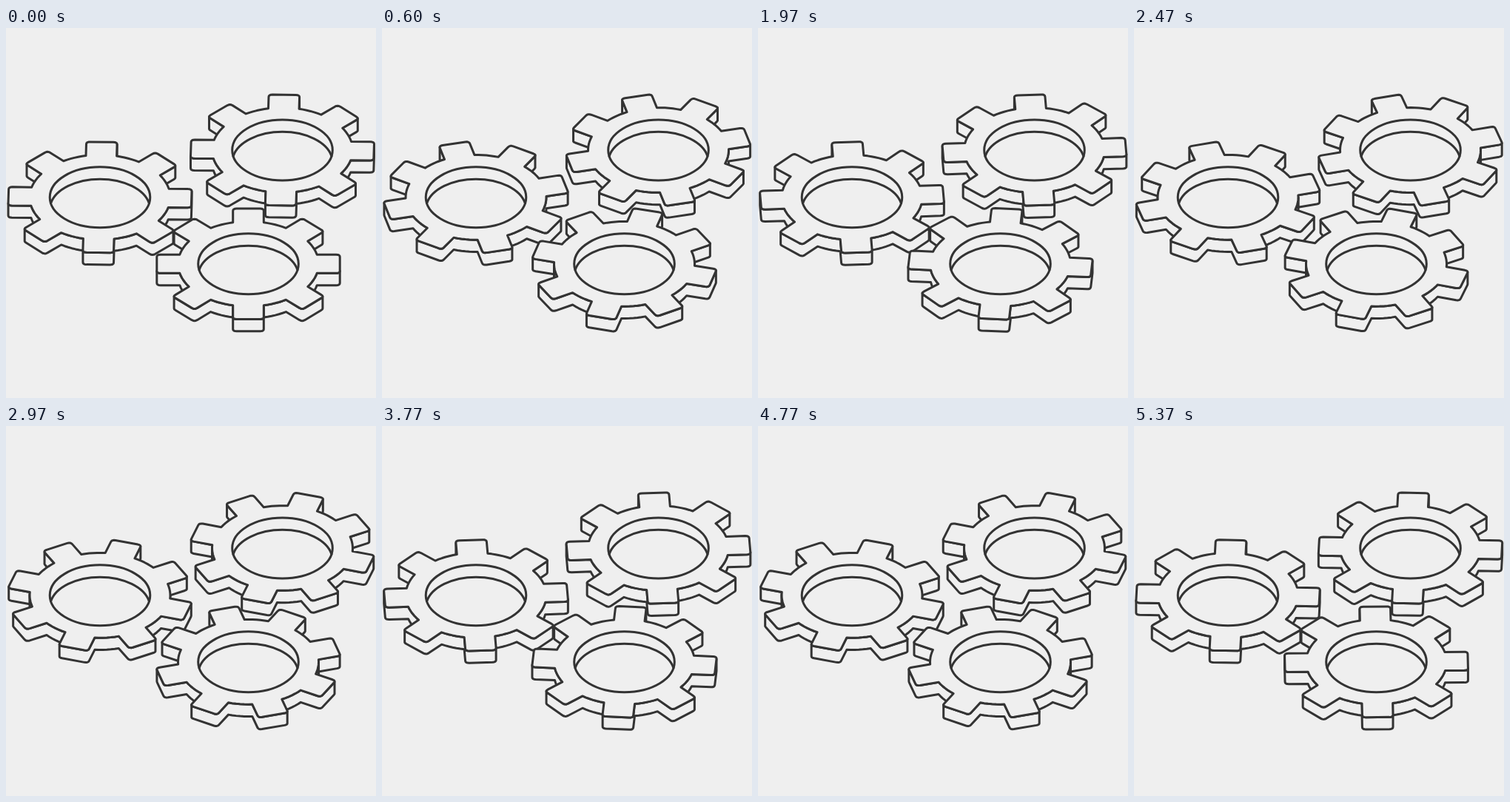
Animation, 500 px wide and 500 px high, one loop 5.41 s. Source, as an HTML page:

```html
<!DOCTYPE html>
<html lang="en">
<head>
<meta charset="utf-8">
<title>Gears</title>
<style>
  html, body { margin: 0; width: 100%; height: 100%; overflow: hidden; background: #efefef; }
  svg { display: block; width: 100vw; height: 100vh; }
  path, ellipse { fill: #efefef; stroke: #333; stroke-width: 3; stroke-linejoin: round; stroke-linecap: round; }
  .edge { fill: none; }
</style>
</head>
<body>
<svg viewBox="0 0 500 500"></svg>
<script>
const LOOP = 5410, STEP = 100 / 3, STEPS = 162, TEETH = 8;
const TILT = 0.604, DEPTH = 16.3;
const TIP = 123.7, ROOT = 95, HOLE = 67.8;
const HALF_TOOTH = 20.8, ROUND = 5;
const RAD = Math.PI / 180;

const gears = [
  { x: 373.5, y: 165, start: 1.1, dir: -1 },
  { x: 127, y: 228.8, start: 1.1, dir: -1 },
  { x: 327.5, y: 318.8, start: 0, dir: 1 }
];

const svg = document.querySelector('svg');
const mix = (a, b, t) => [a[0] + (b[0] - a[0]) * t, a[1] + (b[1] - a[1]) * t];
const toward = (a, b, d) => mix(a, b, d / Math.hypot(b[0] - a[0], b[1] - a[1]));
const line = points => points.map(p => p[0].toFixed(2) + ' ' + p[1].toFixed(2)).join('L');

function corner(before, at, after) {
  const a = toward(at, before, ROUND), b = toward(at, after, ROUND);
  return [0, 0.25, 0.5, 0.75, 1].map(t => mix(mix(a, at, t), mix(at, b, t), t));
}

// One tooth pointing along +x, followed by the arc of the gap after it.
function toothProfile() {
  const rootAngle = Math.asin(HALF_TOOTH / ROOT);
  const rootX = ROOT * Math.cos(rootAngle);
  const r1 = [rootX, -HALF_TOOTH], t1 = [TIP, -HALF_TOOTH];
  const t2 = [TIP, HALF_TOOTH], r2 = [rootX, HALF_TOOTH];
  const points = [r1, ...corner(r1, t1, t2), ...corner(t1, t2, r2), r2];
  const gap = 2 * Math.PI / TEETH - 2 * rootAngle;
  for (let i = 1; i < 6; i++) {
    const a = rootAngle + gap * i / 6;
    points.push([ROOT * Math.cos(a), ROOT * Math.sin(a)]);
  }
  return points;
}
const profile = toothProfile();

function outline(gear, degrees) {
  const points = [];
  for (let i = 0; i < TEETH; i++) {
    const a = (degrees - 90 + i * 360 / TEETH) * RAD, c = Math.cos(a), s = Math.sin(a);
    for (const [x, y] of profile) {
      points.push([gear.x + x * c - y * s, gear.y + TILT * (x * s + y * c)]);
    }
  }
  return points;
}

// Contiguous stretches of the rim that face the viewer, far ones first.
function frontRuns(points) {
  const n = points.length, at = i => points[i % n];
  const faces = i => at(i + 1)[0] < at(i)[0];
  let first = 0;
  while (faces(first)) first++;
  const runs = [];
  let run = null;
  for (let i = first; i <= first + n; i++) {
    if (faces(i)) {
      if (!run) runs.push(run = [at(i)]);
      run.push(at(i + 1));
    } else run = null;
  }
  const nearest = r => Math.max(...r.map(p => p[1]));
  return runs.sort((a, b) => nearest(a) - nearest(b));
}

function drawGear(gear, step) {
  const points = outline(gear, gear.start + gear.dir * step * 135 / STEPS);
  const walls = frontRuns(points).map(run => {
    const bottom = run.map(([x, y]) => [x, y + DEPTH]).reverse();
    return `<path d="M${line([...run, ...bottom])}Z"/>`;
  }).join('');
  const ry = HOLE * TILT;
  const reach = HOLE * Math.sqrt(1 - (DEPTH / 2 / ry) ** 2);
  return walls +
    `<path d="M${line(points)}Z"/>` +
    `<ellipse cx="${gear.x}" cy="${gear.y}" rx="${HOLE}" ry="${ry}"/>` +
    `<path class="edge" d="M${gear.x - reach} ${gear.y + DEPTH / 2}a${HOLE} ${ry} 0 0 1 ${2 * reach} 0"/>`;
}

let shown = -1;
function render(now) {
  const time = Math.floor(now % LOOP / 10) * 10;
  const step = Math.min(STEPS - 1, Math.floor((time + 5) / STEP));
  if (step !== shown) {
    svg.innerHTML = gears.map(gear => drawGear(gear, step)).join('');
    shown = step;
  }
}

const began = performance.now();
function tick() {
  render(performance.now() - began);
  requestAnimationFrame(tick);
}
tick();
</script>
</body>
</html>
```
